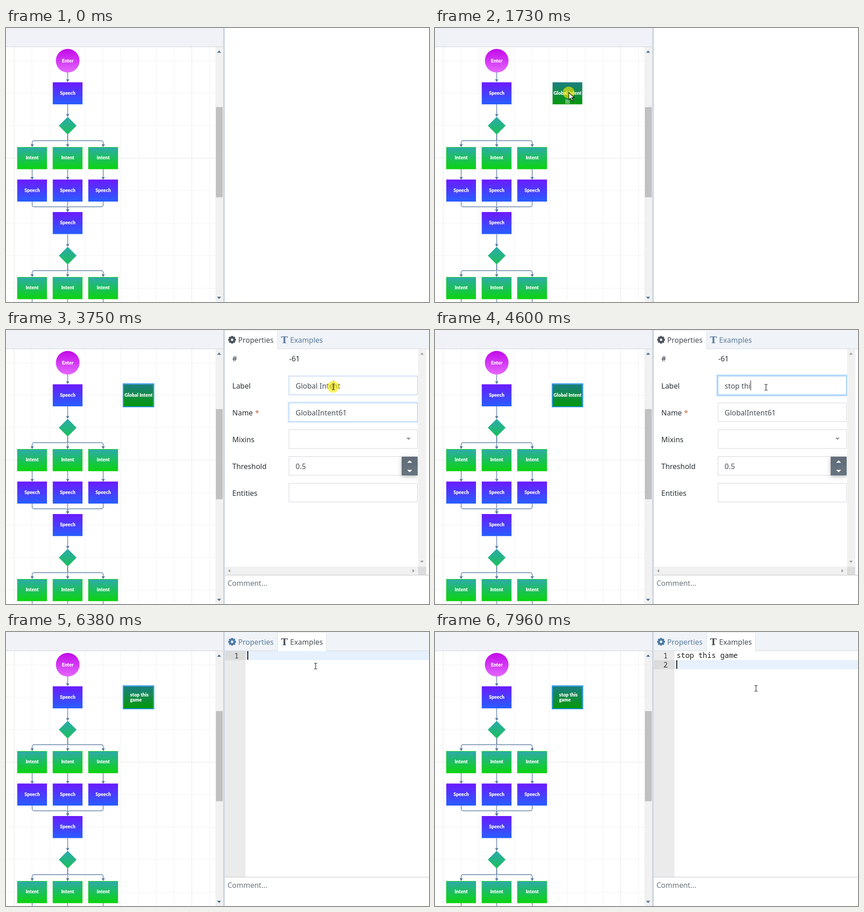
Write an HTML page with a canvas that moves like this. It is 929x603 px and loops after 8000 ms.

```html
<!DOCTYPE html>
<html lang="en">
<head>
<meta charset="utf-8">
<title>Flow editor</title>
<style>
  html, body { margin: 0; width: 100%; height: 100%; overflow: hidden; background: #fff; }
  canvas { display: block; }
</style>
</head>
<body>
<canvas id="stage" width="929" height="603"></canvas>
<script>
const ctx = document.getElementById('stage').getContext('2d');
const LOOP = 8000;
const UI = '16px "Noto Sans", sans-serif';
const MONO = '16px "Noto Sans Mono", monospace';
const NODE = '900 10.5px Lato, sans-serif';
const PHRASE = 'stop this game';
const INK = '#495057', STEEL = '#5b7d9f', EDGE = '#5a7ca3';
const COLUMNS = [57.5, 135.5, 213.5], MID = 135.5;
const SPEECH = ['#6c1aff', '#275eff'];
const INTENT = ['#2eaaac', '#0ad40f'];
const GLOBAL = ['#1b7e80', '#04980a'];

// Moments at which the interface changes
const DROP = 1410, SELECT = 2230, OPEN_PROPS = 3230, TYPE_LABEL = 4120,
      OPEN_EXAMPLES = 5780, FOCUS_EDITOR = 6330, TYPE_EXAMPLE = 6610, NEW_LINE = 7780;
const PRESSES = [[510, 1790], [3090, 3210], [3680, 3820], [5690, 5830], [6230, 6330]];
const MOUSE = [
  [510, -6, 158], [1010, 230, 148], [1310, 338, 144], [1530, 294, 142], [1780, 294, 142],
  [2130, 538, 146], [2330, 590, 85], [2730, 572, 27], [3230, 572, 27], [3630, 719, 125],
  [3900, 719, 125], [4100, 727, 126], [5080, 727, 126], [5530, 655, 52], [5680, 650, 28],
  [5880, 650, 28], [6180, 680, 75], [6530, 680, 75], [6930, 705, 124], [8000, 705, 124]
];

const clamp = v => Math.max(0, Math.min(1, v));

function rect(x, y, w, h, color) {
  ctx.fillStyle = color;
  ctx.fillRect(x, y, w, h);
}

function frame(x, y, w, h, color, width = 1) {
  ctx.strokeStyle = color;
  ctx.lineWidth = width;
  ctx.strokeRect(x, y, w, h);
}

function text(value, x, y, color, font = UI, align = 'left') {
  ctx.font = font;
  ctx.fillStyle = color;
  ctx.textAlign = align;
  ctx.fillText(value, x, y);
}

function textWidth(value) {
  ctx.font = UI;
  return ctx.measureText(value).width;
}

function polygon(points, color) {
  ctx.beginPath();
  points.forEach(([x, y]) => ctx.lineTo(x, y));
  ctx.closePath();
  ctx.fillStyle = color;
  ctx.fill();
}

function disc(x, y, r, color) {
  ctx.beginPath();
  ctx.arc(x, y, r, 0, Math.PI * 2);
  ctx.fillStyle = color;
  ctx.fill();
}

// Triangle pointing along (dx, dy)
function triangle(x, y, dx, dy, color, half = 4.5, depth = 2.5) {
  polygon([
    [x + dx * depth, y + dy * depth],
    [x - dx * depth + dy * half, y - dy * depth + dx * half],
    [x - dx * depth - dy * half, y - dy * depth - dx * half]
  ], color);
}

function vertical(y, h, [top, bottom]) {
  const g = ctx.createLinearGradient(0, y, 0, y + h);
  g.addColorStop(0, top);
  g.addColorStop(1, bottom);
  return g;
}

function node(cx, y, colors, lines, border) {
  rect(cx - 32.8, y, 65.3, 48.5, vertical(y, 48.5, colors));
  if (border) frame(cx - 32.3, y + .5, 64.3, 47.5, border);
  if (lines.length === 1) return text(lines[0], cx, y + 27.3, '#fff', NODE, 'center');
  lines.forEach((line, i) => text(line, cx - 18.5, y + 22 + i * 11.5, '#fff', NODE));
}

const speech = (cx, y) => node(cx, y, SPEECH, ['Speech']);
const intent = (cx, y) => node(cx, y, INTENT, ['Intent'], '#1fd01f');

function diamond(y) {
  polygon([[MID, y - 19.5], [MID + 19.5, y], [MID, y + 19.5], [MID - 19.5, y]],
    vertical(y - 19.5, 39, ['#2ca9ae', '#1bc05a']));
}

// Connector from (x1, y1) to (x2, y2), bending along height bend
function edge(x1, y1, x2, y2, bend = y2, arrow = true) {
  ctx.beginPath();
  ctx.moveTo(x1, y1);
  if (x1 !== x2) {
    ctx.arcTo(x1, bend, x2, bend, 4);
    ctx.arcTo(x2, bend, x2, y2, 4);
  }
  ctx.lineTo(x2, arrow ? y2 - 4 : y2);
  ctx.strokeStyle = EDGE;
  ctx.lineWidth = 1.4;
  ctx.stroke();
  if (arrow) triangle(x2, y2 - 3, 0, 1, EDGE, 3.7, 3);
}

function drawGrid() {
  for (let i = 0; i < 12; i++) rect(18 + i * 39 - .5, 42, 1, 561, i % 10 ? '#f2f2f2' : '#e6e6e6');
  for (let i = 0; i < 8; i++) rect(0, Math.floor(72 + i * 71.45), 460, 1, i === 3 ? '#e6e6e6' : '#f2f2f2');
}

function drawFlow() {
  edge(MID, 98, MID, 119);
  edge(MID, 168, MID, 195.5);
  edge(MID, 454, MID, 481.5);
  for (const x of COLUMNS) {
    edge(MID, 234, x, 262, 248);
    edge(x, 310, x, 334);
    edge(x, 382, MID, 405, 393.5);
    edge(MID, 520, x, 548, 534);
    edge(x, 596, x, 603, 603, false);
    intent(x, 262);
    speech(x, 333.5);
    intent(x, 548);
  }
  disc(MID, 72, 26, vertical(46, 52, ['#c208e8', '#e468ff']));
  text('Enter', MID, 75.5, '#fff', NODE, 'center');
  speech(MID, 119.5);
  speech(MID, 405);
  diamond(215);
  diamond(501);
}

function drawLeft(t) {
  drawGrid();
  drawFlow();
  if (t >= DROP) {
    node(291, 119.5, GLOBAL, t < OPEN_EXAMPLES ? ['Global Intent'] : ['stop this', 'game']);
    if (t < 1890) rect(286, 157, 10, 10, 'rgba(255,255,255,.35)');
    if (t >= SELECT) frame(257.5, 118.5, 67, 50.5, '#2090f0', 2);
  }
  rect(0, 0, 477, 41, '#f0f2f7');
  rect(0, 41, 477, 1, '#cfd5db');
  rect(460, 42, 17, 561, '#f1f1f1');
  rect(461, 174, 15, 198.5, '#c1c1c1');
  triangle(468, 52, 0, -1, '#4f7390');
  triangle(468, 594, 0, 1, '#4f7390');
  rect(477, 0, 3.5, 603, '#cbd5e2');
}

function gear(x, y, color) {
  disc(x, y, 6.6, color);
  for (let i = 0; i < 8; i++) {
    ctx.save();
    ctx.translate(x, y);
    ctx.rotate(i * Math.PI / 4);
    rect(-2.1, -8.5, 4.2, 4, color);
    ctx.restore();
  }
  disc(x, y, 2.7, '#f4f6f9');
}

function drawTabs(propsActive) {
  const [left, width] = propsActive ? [481, 115] : [597, 106];
  rect(481, 0, 448, 41, '#f0f3f7');
  rect(481, 41, 448, 1, '#d3dae1');
  rect(left, 0, width, 42, '#fff');
  ctx.beginPath();
  ctx.moveTo(left - .5, 42);
  ctx.lineTo(left - .5, .5);
  ctx.lineTo(left + width + .5, .5);
  ctx.lineTo(left + width + .5, 42);
  ctx.strokeStyle = '#dbe1e7';
  ctx.lineWidth = 1;
  ctx.stroke();
  const first = propsActive ? INK : STEEL, second = propsActive ? STEEL : INK;
  gear(496.5, 21.5, propsActive ? INK : '#4a78a6');
  text('Properties', 510, 28, first);
  text('T', 604, 28.5, second, 'bold 20px "DejaVu Serif", serif');
  text('Examples', 624, 28, second);
}

function drawEditor(t) {
  const line = t >= NEW_LINE ? 1 : 0;
  const top = 42 + line * 20;
  const typed = PHRASE.slice(0, Math.max(0, Math.floor((t - TYPE_EXAMPLE) / 75)));
  rect(481, 42, 45, 497, '#ebebeb');
  rect(481, top, 45, 20, '#dcdcdc');
  rect(526, top, 403, 20, '#e6f1fd');
  for (let i = 0; i <= line; i++) text(i + 1, 511, 58 + i * 20, '#333', MONO, 'right');
  text(typed, 530.5, 57, '#222', MONO);
  const caret = 530 + (line ? 0 : typed.length * 9.6);
  if (t >= FOCUS_EDITOR) rect(caret, top, 2, 19, '#111');
  else rect(caret, top, 1, 19, '#9aa8b5');
}

function field(label, y, value, focus = 0) {
  text(label, 497, y + 28, '#2b3238');
  rect(621, y, 284, 42, '#fff');
  if (focus) frame(619.5, y - 1.5, 286, 45, `rgba(0,123,255,${.25 * focus})`, 3);
  frame(621.5, y + .5, 282, 41, '#d0d4d8');
  if (focus) frame(621.5, y + .5, 282, 41, `rgba(128,189,255,${Math.min(1, .4 + focus)})`);
  text(value, 636, y + 28, INK);
}

function drawProperties(t) {
  const typing = t >= TYPE_LABEL;
  const label = typing ? PHRASE.slice(0, Math.floor((t - TYPE_LABEL) / 58)) : 'Global Intent';
  text('#', 497, 69, '#2b3238');
  text('-61', 622, 69, '#2b3238');
  field('Name', 160, 'GlobalIntent61', clamp((3790 - t) / 100));
  text('*', 547, 188, '#c4683a');
  field('Label', 101, label, clamp((t - 3735) / 150));
  field('Mixins', 219, '');
  field('Threshold', 278, '0.5');
  field('Entities', 337, '');

  if (typing) rect(Math.round(636 + textWidth(label)), 111, 1, 22, '#222');
  else if (t >= 3950) {
    rect(636, 112, textWidth(label), 22, '#3390ff');
    text(label, 636, 129, '#fff');
  } else if (t >= 3730) rect(719, 111, 1, 22, '#777');

  triangle(884, 239.5, 0, 1, '#999', 5, 2.5);
  ctx.save();
  ctx.shadowColor = 'rgba(0,0,0,.3)';
  ctx.shadowBlur = 8;
  ctx.shadowOffsetY = 2;
  rect(869, 279, 35, 41, '#626e7a');
  ctx.restore();
  rect(869, 299, 35, 21, '#66727e');
  triangle(886.5, 289.5, 0, -1, '#fff', 5.5, 2.7);
  triangle(886.5, 310.5, 0, 1, '#fff', 5.5, 2.7);

  rect(905, 42, 18, 479, '#f1f1f1');
  rect(481, 521, 424, 18, '#f1f1f1');
  rect(905, 521, 18, 18, '#dcdcdc');
  triangle(913.5, 52, 0, -1, '#a0a0a0', 4, 2.3);
  triangle(913.5, 510, 0, 1, '#a0a0a0', 4, 2.3);
  triangle(490, 530, -1, 0, '#a0a0a0', 4, 2.3);
  triangle(895, 530, 1, 0, '#a0a0a0', 4, 2.3);
}

function drawPanel(t) {
  if (t < SELECT) return;
  const propsActive = t >= OPEN_PROPS && t < OPEN_EXAMPLES;
  if (propsActive) drawProperties(t); else drawEditor(t);
  drawTabs(propsActive);
  rect(481, 539, 448, 1, '#bfc3c7');
  text('Comment...', 486.5, 562.5, '#6c757d');
}

const ARROW = new Path2D('M0 0V16L3.8 12.4 6.6 18.6 9.2 17.4 6.4 11.4H11.6Z');
const HAND = new Path2D('M-1.5 1.2Q0-.6 1.5 1.2V8Q3.2 6.6 4.4 8.4 6.4 7.4 7.4 9.2 9.6 8.6 9.8 11V14Q9.6 17 8 20H0Q-2 16-5 12.6-5.4 10-3.2 10.6L-1.5 12.4Z');
const BEAM = new Path2D('M-3.5-6.5Q-.5-6.5 0-5.5.5-6.5 3.5-6.5M0-5.5V5.5M-3.5 6.5Q-.5 6.5 0 5.5.5 6.5 3.5 6.5');

function mouseAt(t) {
  const i = MOUSE.findIndex(key => key[0] > t);
  if (i < 1) return null;
  const [t0, x0, y0] = MOUSE[i - 1], [t1, x1, y1] = MOUSE[i];
  const k = (t - t0) / (t1 - t0);
  return [x0 + (x1 - x0) * k, y0 + (y1 - y0) * k];
}

function cursorKind(t, x, y) {
  if (t < SELECT || x < 481) return 'arrow';
  if (y < 42) return 'hand';
  const inProps = t >= OPEN_PROPS && t < OPEN_EXAMPLES;
  const overText = inProps ? x > 621 && y > 100 && y < 143 : x > 526;
  return overText ? 'beam' : 'arrow';
}

function drawMouse(t) {
  // The pointer moves ten times a second
  const point = mouseAt(t < 30 ? 0 : t - (t - 30) % 100);
  if (!point) return;
  const [x, y] = point;
  if (PRESSES.some(([from, to]) => t >= from && t < to)) disc(x - .5, y, 13, 'rgba(250,236,0,.62)');
  const kind = cursorKind(t, x, y);
  ctx.save();
  ctx.translate(x, y);
  ctx.lineWidth = 1.2;
  if (kind === 'beam') {
    ctx.strokeStyle = '#222';
    ctx.stroke(BEAM);
  } else {
    const shape = kind === 'hand' ? HAND : ARROW;
    ctx.fillStyle = '#fff';
    ctx.strokeStyle = '#111';
    ctx.fill(shape);
    ctx.stroke(shape);
  }
  ctx.restore();
}

function draw(now) {
  const t = now % LOOP;
  rect(0, 0, 929, 603, '#fff');
  drawLeft(t);
  drawPanel(t);
  drawMouse(t);
  requestAnimationFrame(draw);
}
requestAnimationFrame(draw);
</script>
</body>
</html>
```
